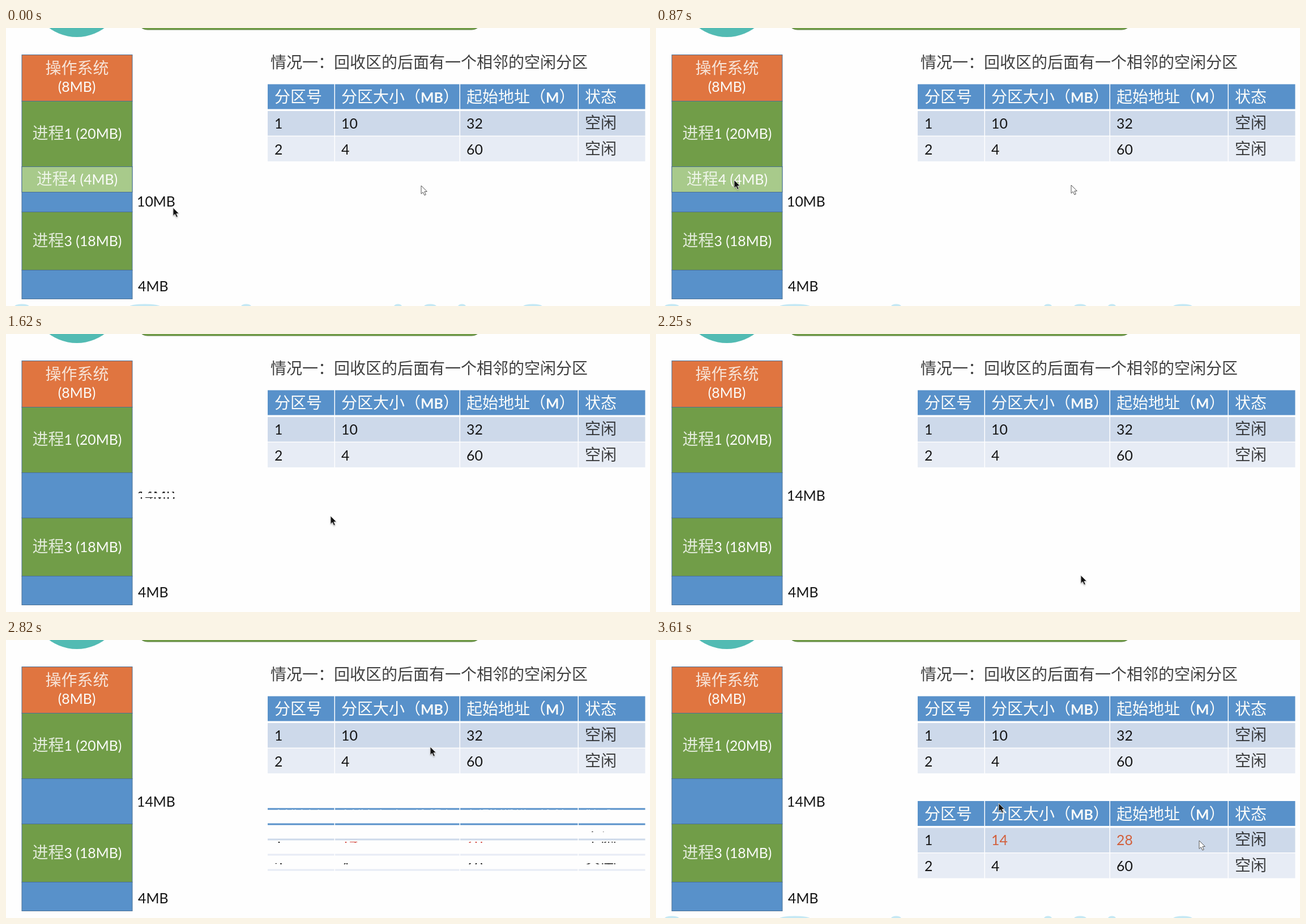
Animation, 1137 px wide and 492 px high, one loop 3650 ms. Source, as an HTML page with a canvas:

```html
<!DOCTYPE html>
<html lang="zh">
<head>
<meta charset="utf-8">
<style>
html, body { margin: 0; width: 100%; height: 100%; overflow: hidden; background: #fefefe; }
canvas { display: block; }
</style>
</head>
<body>
<canvas id="stage" width="1137" height="492"></canvas>
<script>
const ctx = document.getElementById('stage').getContext('2d');
const LOOP = 3650;
const BLUE = '#5891ca', GREEN = '#719d48', LIGHT = '#a8ca8b', ORANGE = '#e07540';
const WHITE = '#fbfcfa', INK = '#151515';

// Pointer paths as [time, x, y]
const DARK_PATH = [[0, 295, 318], [870, 138, 269], [1620, 573, 322], [2250, 750, 427],
  [2820, 749, 189], [3040, 667, 336], [3330, 605, 289]];
const LIGHT_PATH = [[0, 733, 279], [870, 733, 278], [1450, 733, 278], [3200, 749, 283],
  [3440, 749, 283], [3610, 959, 355]];

const clamp = v => Math.max(0, Math.min(1, v));

function at(path, t) {
  const i = path.findIndex(p => p[0] > t);
  if (i < 0) return path[path.length - 1].slice(1);
  const [t0, x0, y0] = path[i - 1], [t1, x1, y1] = path[i];
  const u = (t - t0) / (t1 - t0), e = u * u * (3 - 2 * u);
  return [x0 + (x1 - x0) * e, y0 + (y1 - y0) * e];
}

function box(x, y, w, h, color) {
  ctx.fillStyle = color;
  ctx.fillRect(x, y, w, h);
}

// Latin and Chinese runs use different faces and sizes; plain Chinese is paler.
function text(str, x, y, color, { bold = false, center = false } = {}) {
  const runs = str.match(/[\x00-\x7f]+|[^\x00-\x7f]+/g).map(s => {
    const latin = s.charCodeAt(0) < 128;
    const font = latin
      ? (bold ? '700' : '400') + ' 24.8px Lato, sans-serif'
      : (bold ? '400' : '300') + ' 28px "Noto Sans CJK SC", "Noto Sans CJK", sans-serif';
    ctx.font = font;
    return { s, font, w: ctx.measureText(s).width, alpha: latin || bold ? 1 : .82 };
  });
  if (center) x -= runs.reduce((sum, r) => sum + r.w, 0) / 2;
  ctx.fillStyle = color;
  for (const r of runs) {
    ctx.font = r.font;
    ctx.globalAlpha = r.alpha;
    ctx.fillText(r.s, x, y);
    x += r.w;
  }
  ctx.globalAlpha = 1;
}

function block(y, bottom, color, label, baseline) {
  box(28, y, 195, bottom - y, color);
  ctx.strokeStyle = '#4a7096';
  ctx.lineWidth = 1;
  ctx.strokeRect(28, y + .5, 195, bottom - y);
  if (label) text(label, 125.5, baseline, WHITE, { center: true });
}

function tableCells(dy) {
  const edges = [462, 581, 802, 1011, 1130];
  for (const [y, h, fill] of [[99.5, 44, BLUE], [147, 43.5, '#cdd9ea'], [192, 44, '#e7ecf5']])
    for (let c = 0; c < 4; c++)
      box(edges[c], y + dy, edges[c + 1] - edges[c] - 1.5, h, fill);
}

function tableText(dy, first, accent) {
  const textX = [474, 592, 813, 1022];
  const rows = [
    [132, ['分区号', '分区大小（MB）', '起始地址（M）', '状态']],
    [177.5, ['1', ...first, '空闲']],
    [223.5, ['2', '4', '60', '空闲']]
  ];
  rows.forEach(([base, cells], r) => cells.forEach((cell, c) => {
    const color = r === 0 ? WHITE : r === 1 && (c === 1 || c === 2) ? accent : INK;
    text(cell, textX[c], base + dy, color, { bold: r === 0 });
  }));
}

// Horizontal blinds: each slat opens downward.
function blinds(top, pitch, count, progress, draw) {
  if (progress <= 0) return;
  ctx.save();
  if (progress < 1) {
    ctx.beginPath();
    for (let k = 0; k < count; k++) ctx.rect(0, top + k * pitch, 1137, pitch * progress);
    ctx.clip();
  }
  draw();
  ctx.restore();
}

function pointer([x, y], fill, edge, shadow) {
  ctx.save();
  ctx.translate(x, y);
  ctx.beginPath();
  [[0, 0], [0, 14.5], [3.3, 11.5], [5.8, 17], [8.3, 16], [5.9, 10.6], [10.3, 10.4]]
    .forEach(p => ctx.lineTo(...p));
  ctx.closePath();
  ctx.lineJoin = 'round';
  ctx.fillStyle = fill;
  ctx.strokeStyle = edge;
  ctx.lineWidth = 1;
  if (shadow) {
    ctx.shadowColor = 'rgba(0,0,0,.3)';
    ctx.shadowBlur = 3;
    ctx.shadowOffsetY = 1.5;
  }
  ctx.fill();
  ctx.shadowColor = 'transparent';
  ctx.stroke();
  ctx.restore();
}

function header() {
  ctx.fillStyle = '#52bbb3';
  ctx.beginPath();
  ctx.arc(125, -66, 82, 0, 7);
  ctx.fill();
  ctx.fillStyle = GREEN;
  ctx.strokeStyle = '#587d3c';
  ctx.lineWidth = 1;
  ctx.beginPath();
  ctx.roundRect(232, -40, 608, 43, 18);
  ctx.fill();
  ctx.stroke();
}

function bottomEdge() {
  ctx.fillStyle = '#c4e8f4';
  for (const [x, w] of [[28, 13], [245, 27], [424, 9], [692, 7], [749, 11], [805, 7], [930, 17]]) {
    ctx.beginPath();
    ctx.ellipse(x, 493, w, 4.5, 0, 0, 7);
    ctx.fill();
  }
}

function draw(t) {
  const merged = t >= 1450, awake = !merged || t >= 3200;
  box(0, 0, 1137, 492, '#fefefe');
  header();
  if (awake) bottomEdge();

  block(47, 129, ORANGE, '操作系统', 80.5);
  text('(8MB)', 125, 113, WHITE, { center: true });
  block(129, 245, GREEN, '进程1 (20MB)', 196);
  block(245, 325, BLUE);
  if (!merged) {
    block(245, 290, LIGHT, '进程4 (4MB)', 277);
    text('10MB', 231, 316, INK);
  }
  block(325, 428, GREEN, '进程3 (18MB)', 386);
  block(428, 479, BLUE);
  text('4MB', 233, 466, INK);
  blinds(269, 10, 4, clamp((t - 1555) / 265), () => text('14MB', 231, 295, INK));

  text('情况一：回收区的后面有一个相邻的空闲分区', 467, 70.5, INK);
  tableCells(0);
  tableText(0, ['10', '32'], INK);

  // Cells and lettering of the second table open with their own slat pitch.
  const open = clamp((t - 2793) / 255);
  blinds(270.5, 27, 6, open, () => tableCells(185.5));
  blinds(281, 19, 8, open,
    () => tableText(185.5, ['14', '28'], t < 3200 ? '#d0453c' : '#d2603c'));

  if (awake) pointer(at(LIGHT_PATH, t), '#fff', '#555', false);
  pointer(at(DARK_PATH, t), '#111', '#ddd', true);
}

const start = performance.now();
function frame() {
  draw((performance.now() - start) % LOOP);
  requestAnimationFrame(frame);
}
frame();
</script>
</body>
</html>
```
